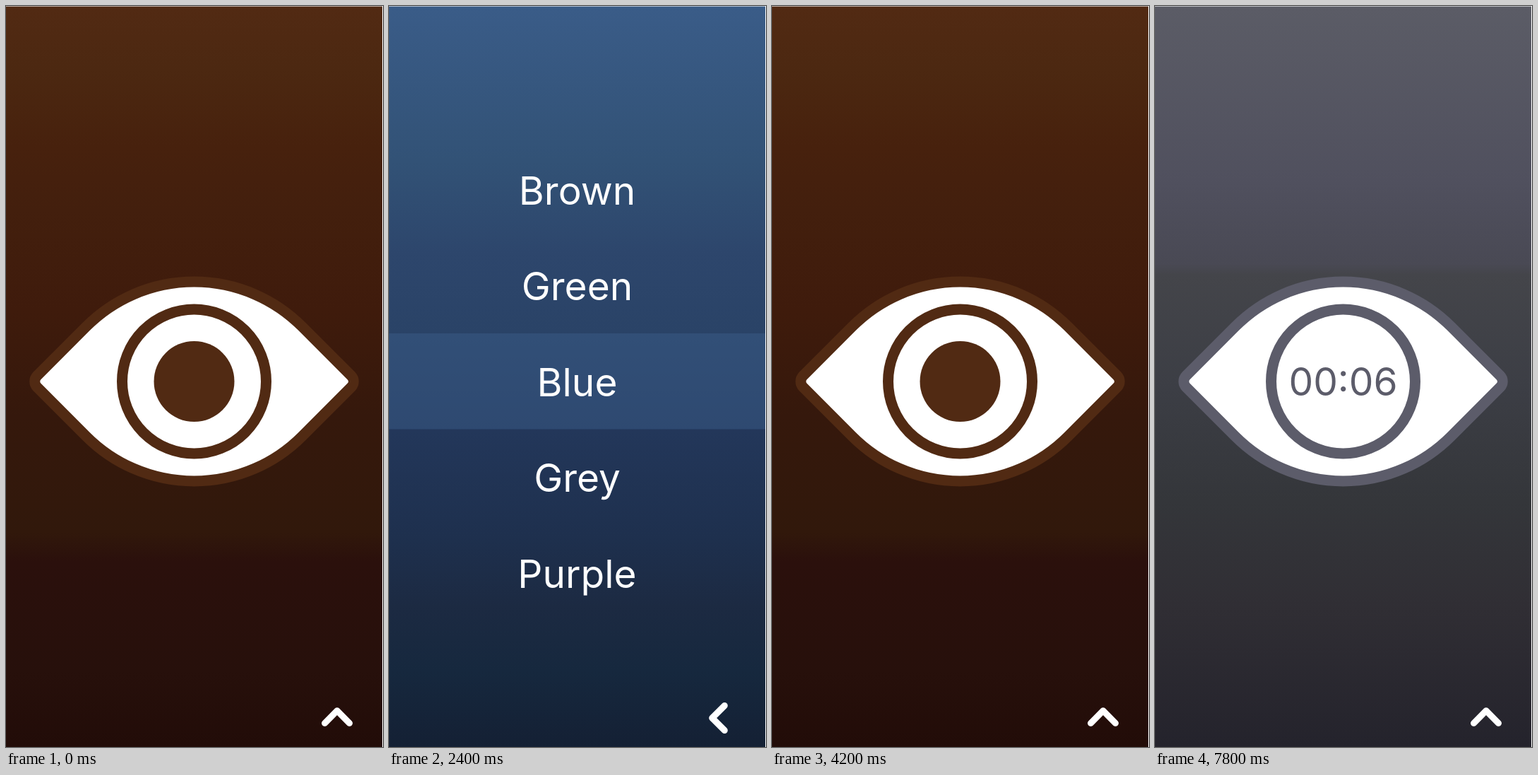
These frames come from a looping animation (534x1048 px, 8000 ms). An HTML page with a canvas:

```html
<!DOCTYPE html>
<html lang="en">
<head>
<meta charset="utf-8">
<title>Eye timer</title>
<style>
  html, body { margin: 0; width: 100%; height: 100%; overflow: hidden; background: #fff; }
  canvas { display: block; width: 534px; height: 1048px; }
</style>
</head>
<body>
<canvas width="534" height="1048"></canvas>
<script>
const ctx = document.querySelector('canvas').getContext('2d');
const W = 534, H = 1048, CX = 266.5, CY = 531;
const LOOP = 8000, STEP = 300;
const ROWS = ['Brown', 'Green', 'Blue', 'Grey', 'Purple'];

// Each theme: accent colour, then background stops as [y, colour].
const THEMES = {
  Brown: ['#512a13', [0, '#522a13'], [90, '#4c2811'], [200, '#47210d'], [290, '#431f0d'],
    [430, '#3f1b0c'], [580, '#35180c'], [745, '#31180b'], [785, '#2b100c'], [940, '#27100b'], [H, '#220c08']],
  Green: ['#2f5f42', [0, '#2f5f42'], [460, '#254a35'], [H, '#11251b']],
  Blue: ['#3a5c88', [0, '#3a5c88'], [220, '#325276'], [350, '#2d466c'], [460, '#2a4367'],
    [600, '#23375a'], [750, '#1e304e'], [850, '#1c2a42'], [940, '#16283e'], [H, '#142034']],
  Grey: ['#5c5c6a', [0, '#5b5c66'], [250, '#50505e'], [365, '#494954'], [380, '#44454a'],
    [540, '#3c3e45'], [700, '#34363a'], [850, '#302e34'], [H, '#24232c']],
  Purple: ['#5e486c', [0, '#5e486c'], [250, '#543e62'], [265, '#4d3a5b'], [480, '#483450'],
    [600, '#422c46'], [730, '#3a2842'], [870, '#34223c'], [H, '#281a2e']]
};
const SCHEDULE = [[0, 'Brown'], [1500, 'Green'], [2100, 'Blue'], [2700, 'Grey'],
  [3300, 'Purple'], [3900, 'Brown'], [6600, 'Grey']];

const ease = (t, from, to) => {
  const k = Math.min(1, Math.max(0, (t - from) / (to - from)));
  return k * k * (3 - 2 * k);
};

function text(str, baseline, color) {
  ctx.font = '400 55px Inter, Roboto, sans-serif';
  ctx.textAlign = 'center';
  ctx.fillStyle = color;
  ctx.fillText(str, CX, baseline);
}

function circle(r) {
  ctx.beginPath();
  ctx.arc(CX, CY, r, 0, 7);
}

function background([, ...stops]) {
  const g = ctx.createLinearGradient(0, 0, 0, H);
  for (const [y, color] of stops) g.addColorStop(y / H, color);
  ctx.fillStyle = g;
  ctx.fillRect(0, 0, W, H);
}

// Two large arcs joined by 45 degree lines with rounded corners.
function eyeShape() {
  const R = 216, r = 11.5, lid = CY - 141 + R, corner = 230.5 - r * Math.SQRT2, q = Math.PI / 4;
  ctx.beginPath();
  ctx.arc(CX, lid, R, -3 * q, -q);
  ctx.arc(CX + corner, CY, r, -q, q);
  ctx.arc(CX, 2 * CY - lid, R, q, 3 * q);
  ctx.arc(CX - corner, CY, r, 3 * q, 5 * q);
  ctx.closePath();
}

function eye(accent, clock) {
  ctx.strokeStyle = accent;
  ctx.lineWidth = 15;
  ctx.fillStyle = '#fff';
  eyeShape();
  ctx.fill();
  ctx.stroke();
  circle(102);
  ctx.stroke();
  if (clock) return text(clock, 551, accent);
  circle(57);
  ctx.fillStyle = accent;
  ctx.fill();
}

function menu(accent, selected, alpha) {
  ctx.fillStyle = accent;
  ctx.globalAlpha = alpha * 0.5;
  ctx.fillRect(0, 192 + 135.5 * ROWS.indexOf(selected), W, 135.5);
  ctx.globalAlpha = alpha;
  ROWS.forEach((name, i) => text(name, 280.5 + 135.5 * i, '#fff'));
}

function chevron(open) {
  ctx.save();
  ctx.translate(469 - 2.5 * open, 1005.5 + 1.5 * open);
  ctx.rotate(-open * Math.PI / 2);
  ctx.beginPath();
  ctx.moveTo(-17.5, 8.8);
  ctx.lineTo(0, -8.8);
  ctx.lineTo(17.5, 8.8);
  ctx.strokeStyle = '#fff';
  ctx.lineWidth = 9;
  ctx.lineCap = ctx.lineJoin = 'round';
  ctx.stroke();
  ctx.restore();
}

function clockAt(t) {
  if (t < 4500) return '';
  const left = t < 6600 ? 1200 - Math.floor((t - 4500) / 500) : 6 + Math.floor((7800 - t) / 500);
  const pad = n => String(n).padStart(2, '0');
  return pad(Math.floor(left / 60)) + ':' + pad(left % 60);
}

function draw(t) {
  const name = SCHEDULE.findLast(([start]) => t >= start)[1];
  const theme = THEMES[name], accent = theme[0];
  const open = ease(t, 450, 750) - ease(t, 3900, 4200);

  background(theme);
  if (open < 1) {
    ctx.globalAlpha = 1 - open;
    eye(accent, clockAt(t));
  }
  if (open > 0) menu(accent, name, open);
  ctx.globalAlpha = 1;
  chevron(open);

  // Pale edge along the top and right.
  ctx.fillStyle = 'rgba(255,255,255,.6)';
  ctx.fillRect(0, 0, W, 1);
  ctx.fillStyle = '#fff';
  ctx.fillRect(W - 1, 0, 1, H);
}

const begin = performance.now();
function tick() {
  const t = (performance.now() - begin) % LOOP;
  draw(Math.floor(t / STEP) * STEP);
  requestAnimationFrame(tick);
}
tick();
</script>
</body>
</html>
```
